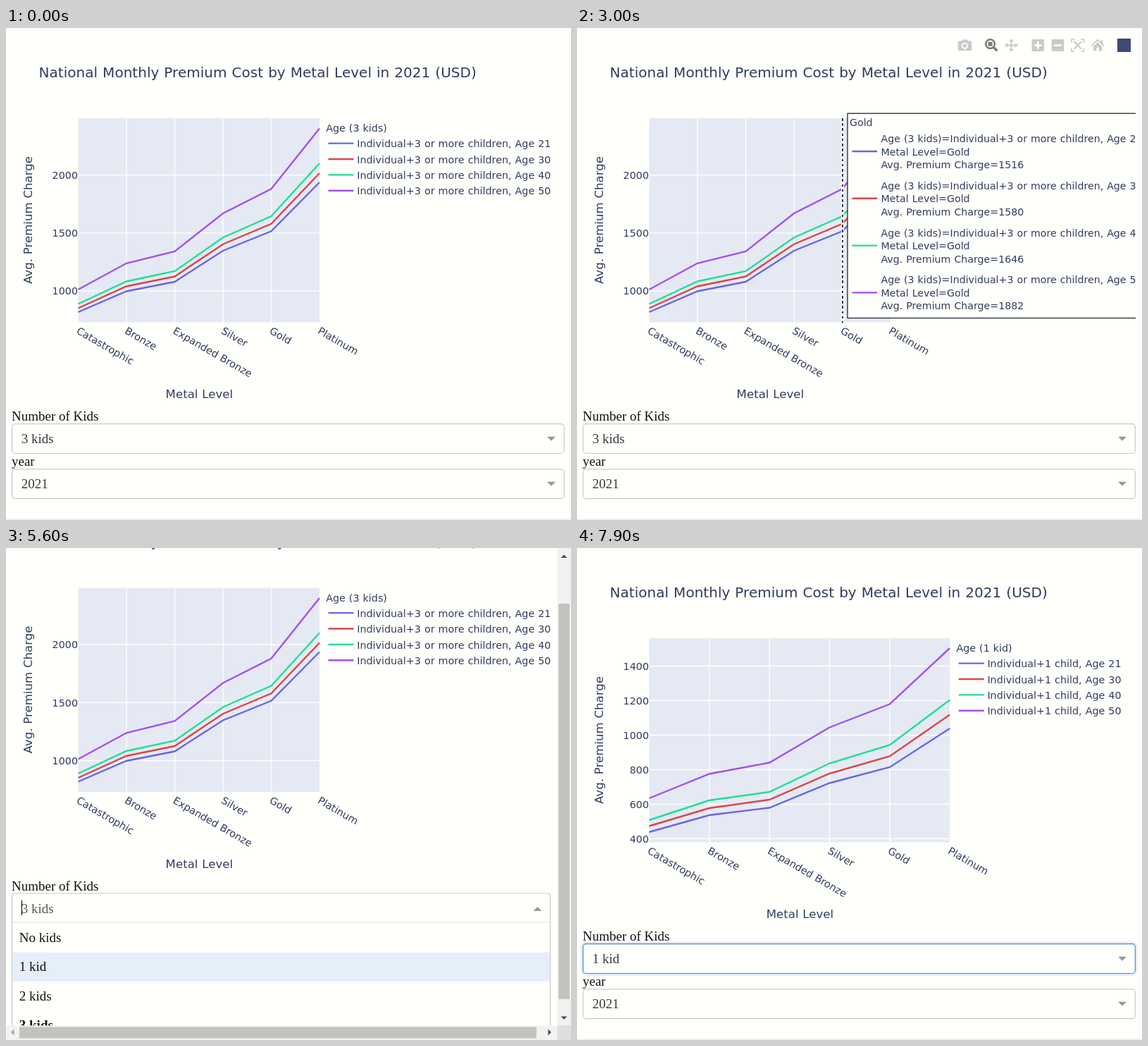
An HTML page for the animation above (8000 ms loop, 802 by 698 pixels).

```html
<!DOCTYPE html>
<html lang="en">
<head>
<meta charset="utf-8">
<title>Premium chart</title>
<style>
  html, body { margin: 0; width: 100%; height: 100%; overflow: hidden; background: #fffffc; }
  svg { display: block; width: 802px; height: 698px; }
  text { font-family: "DejaVu Sans", sans-serif; fill: #303c5c; white-space: pre; word-spacing: .034em; }
  .serif text { font-family: "Liberation Serif", serif; font-size: 19px; fill: #111; word-spacing: 0; }
  .serif .value { fill: #3a3a3a; }
  .frame { fill: #fffffc; stroke: #c9c9c9; stroke-width: 1.2; }
</style>
</head>
<body>
<svg id="stage" viewBox="0 0 802 698"></svg>
<script>
const LOOP = 8000, SCROLL = 71.5, LEFT = 102.5, BG = '#fffffc';
const COLORS = ['#6666e6', '#dc4545', '#1ddf96', '#a350ee'];
const AGES = [21, 30, 40, 50];
const LEVELS = ['Catastrophic', 'Bronze', 'Expanded Bronze', 'Silver', 'Gold', 'Platinum'];

const THREE = {
  kids: '3 kids', who: 'Individual+3 or more children',
  ticks: [2000, 1500, 1000], top: 208.7, gap: 82.25,
  lines: [
    [403, 373.5, 360, 316, 288.3, 219],
    [397.5, 366.5, 352.5, 306.7, 277.8, 206],
    [391.5, 359.5, 345, 297.2, 267, 192],
    [371, 333.8, 317, 263, 228.2, 142.5]]
};
const ONE = {
  kids: '1 kid', who: 'Individual+1 child',
  ticks: [1400, 1200, 1000, 800, 600, 400], top: 167.5, gap: 49,
  lines: [
    [403, 379, 368.5, 333.5, 311, 256],
    [394.5, 369, 357, 320, 295.5, 236.5],
    [386, 358, 346, 305.5, 279.5, 215.5],
    [355, 320.5, 304.5, 254.5, 221.5, 142]]
};

const text = (x, y, s, size = 14.3, more = '') =>
  `<text x="${x}" y="${y}" font-size="${size}" ${more}>${s}</text>`;
const rect = (x, y, w, h, fill, more = '') =>
  `<rect x="${x}" y="${y}" width="${w}" height="${h}" fill="${fill}" ${more}/>`;
const path = (d, stroke, width, more = '') =>
  `<path d="${d}" fill="none" stroke="${stroke}" stroke-width="${width}" ${more}/>`;
const shape = (d, fill) => `<path d="${d}" fill="${fill}" fill-rule="evenodd"/>`;
const group = (id, body, more = '') => `<g id="${id}" ${more}>${body}</g>`;

function chart(id, right, data) {
  const xs = LEVELS.map((_, i) => LEFT + (right - LEFT) * i / 5);
  let out = rect(LEFT, 128, right - LEFT, 289.5, '#e5e9f3');
  xs.slice(1, 5).forEach(x => out += path(`M${x} 128V417.5`, '#fff', 1.3));
  data.ticks.forEach((v, i) => {
    const y = data.top + i * data.gap;
    out += path(`M${LEFT} ${y}H${right}`, '#fff', 1.3);
    out += text(102, y + 5.2, v, 14.3, 'text-anchor="end"');
  });
  data.lines.forEach((ys, i) => {
    const y = 163.6 + i * 22.4;
    out += path('M' + ys.map((v, k) => `${xs[k]} ${v}`).join('L'), COLORS[i], 2.4);
    out += path(`M${right + 12.5} ${y}h36`, COLORS[i], 2.4);
    out += text(right + 53.2, y + 5.6, `${data.who}, Age ${AGES[i]}`);
  });
  LEVELS.forEach((s, i) => out += text(0, 0, s, 14.4,
    `transform="translate(${xs[i] - 3.6} 432.6) rotate(30)"`));
  out += text(right + 9.2, 147, `Age (${data.kids})`);
  out += text((LEFT + right) / 2 + .6, 525, 'Metal Level', 16.6, 'text-anchor="middle"');
  return group(id, out);
}

function hoverCard() {
  let out = path('M377 128V417.5', BG, 4, 'shape-rendering="crispEdges"');
  out += path('M377 128V417.5', '#303036', 2, 'stroke-dasharray="3.6 3.6" shape-rendering="crispEdges"');
  out += rect(384, 121.2, 430, 290.3, BG, 'stroke="#30343c" stroke-width="1.4"');
  out += text(387, 139.2, 'Gold', 14.2);
  [1516, 1580, 1646, 1882].forEach((v, i) => {
    const y = 162 + i * 66.8;
    out += path(`M390.5 ${y + 13}h35.5`, COLORS[i], 2.4);
    [`Age (3 kids)=${THREE.who}, Age ${AGES[i]}`, 'Metal Level=Gold', `Avg. Premium Charge=${v}`]
      .forEach((s, k) => out += text(431.5, y + k * 18.5, s, 14.2));
  });
  return group('hover', out, 'clip-path="url(#edge)"');
}

function modebar() {
  const g = '#cacacc', d = '#7d7d82';
  const box = x => rect(x, 16, 17.4, 17, g, 'rx="1.5"');
  let out = shape('M542.5 18.5h3l1.5-2h7l1.5 2h3q1.7 0 1.7 1.7v10.3q0 1.7-1.7 1.7h-16q-1.7 0-1.7-1.7V20.2' +
    'q0-1.7 1.7-1.7zM550.5 20.6a4.6 4.6 0 1 0 .01 0z', g);
  out += `<circle cx="550.5" cy="25.2" r="2.6" fill="${g}"/>`;
  out += `<circle cx="586.6" cy="22.6" r="6.3" fill="none" stroke="${d}" stroke-width="2.6"/>`;
  out += rect(583.6, 19.6, 6, 6, d) + path('M591.5 27.5l5 5', d, 3.4);
  out += path('M616.5 18v13M610 24.5h13', g, 2);
  out += shape('M616.5 15l3.5 4.2h-7zM616.5 34l3.5-4.2h-7zM607 24.5l4.2-3.5v7zM626 24.5l-4.2-3.5v7z', g);
  out += box(645.6) + path('M649 24.5h10.6M654.3 19.2v10.6', BG, 2.6);
  out += box(673.8) + path('M677.2 24.5h10.6', BG, 2.6);
  out += path('M702 20.5V16h4.5M715 16h4.5v4.5M719.5 28.5V33H715M706.5 33H702v-4.5', g, 1.7);
  out += path('M705.5 19.3l10.5 10.5M716 19.3l-10.5 10.5', g, 2.2);
  out += shape('M739.2 15.5l4.8 4.7v-3h2.3v5.3l2.2 2.3-1.2 1.2-8.1-7.9-8.1 7.9-1.2-1.2z', g);
  out += shape('M739.2 20l6 6v6.5h-4.3v-5h-3.4v5h-4.3V26z', g);
  return group('bar', out + rect(767, 15, 19, 19, '#3d4a75'));
}

const control = (y, id, value) =>
  `<rect id="${id}Box" class="frame" x="8.6" y="${y}" width="783.8" height="41.8" rx="4.5"/>` +
  `<text id="${id}" class="value" x="21.8" y="${y + 27.2}">${value}</text>` +
  shape(`M768 ${y + 18}h12l-6 6z`, '#999');

function menu() {
  let out = rect(0, 489, 802, 209, BG);
  out += '<path class="frame" d="M8.6 700V494.5q0-4.5 4.5-4.5H768q4.5 0 4.5 4.5V700"/>';
  out += path('M9 531H772', '#e2e2e2', 1.2);
  out += '<rect id="pick" x="9.2" width="762.7" height="41.4" fill="#e5effa"/>';
  out += '<text class="value" x="21.8" y="517.6" style="fill:#555">3 kids</text>';
  out += shape('M748.5 515h12l-6-6z', '#999') + rect(21.8, 500, 1.2, 21, '#111', 'id="caret"');
  ['No kids', '1 kid', '2 kids', '3 kids'].forEach((s, i) =>
    out += `<text x="18.8" y="${558.7 + i * 41.4}"${i > 2 ? ' font-weight="bold"' : ''}>${s}</text>`);
  out += path('M9 697.3H772', '#c9c9c9', 1.2);
  return group('menu', out, 'class="serif"');
}

function scrollbars() {
  const track = '#f2f2f0', dark = '#4c4c4c';
  let out = rect(782.5, 0, 19.5, 698, track) + rect(784.3, 0, 15.7, 0, '#c2c2bf', 'id="thumb"');
  out += shape('M787.5 14h9l-4.5-4.5z', dark) + group('down', shape('M787.5 0h9l-4.5 4.5z', dark));
  out += group('across', rect(0, 677.5, 782.5, 20.5, track) + rect(19, 679.5, 734, 16, '#c2c2bf') +
    rect(782.5, 677.5, 19.5, 20.5, '#dedee0') +
    shape('M11.5 682.5v9l-4.5-4.5z', '#a5a5a5') + shape('M769.5 682.5v9l4.5-4.5z', dark));
  return group('bars', out);
}

const stage = document.getElementById('stage');
stage.innerHTML =
  '<defs><clipPath id="edge"><rect x="360" y="0" width="433" height="698"/></clipPath></defs>' +
  rect(0, 0, 802, 698, BG) +
  group('page',
    text(46.6, 69.5, 'National Monthly Premium Cost by Metal Level in 2021 (USD)', 20.05) +
    text(0, 0, 'Avg. Premium Charge', 16.6, 'text-anchor="middle" transform="translate(36.8 272.5) rotate(-90)"') +
    chart('wide', 445, THREE) + chart('narrow', 426.4, THREE) + chart('single', 529.2, ONE) +
    hoverCard() + modebar() +
    group('form', '<text x="8" y="557">Number of Kids</text><text x="8" y="621">year</text>' +
      '<rect id="glow" x="7" y="560" width="787" height="45" rx="6" fill="none" stroke="#dcebf8" stroke-width="3"/>' +
      control(561.7, 'kids', '3 kids') + control(625.8, 'year', '2021'), 'class="serif"')) +
  group('foot', rect(0, 696.7, 802, 1.3, '#ececea')) + menu() + scrollbars();

const $ = Object.fromEntries([...stage.querySelectorAll('[id]')].map(e => [e.id, e]));
const show = (e, on) => e.setAttribute('visibility', on ? 'inherit' : 'hidden');
const within = (t, a, b) => t >= a && t < b;
const ease = (t, start, span) => {
  const p = Math.min(1, Math.max(0, (t - start) / span));
  return 1 - (1 - p) ** 2;
};
// Highlighted option: [from ms, row]
const PICKS = [[0, 1], [5900, 2], [6100, 3], [7000, 2], [7100, 1]];

function draw(t) {
  const open = within(t, 5600, 7400), resized = t >= 5700, done = t >= 7400, fresh = t >= 7500;
  $.page.setAttribute('transform', `translate(0 ${open ? -SCROLL : 0})`);
  show($.wide, !fresh && !(resized && open));
  show($.narrow, resized && open);
  show($.single, fresh);
  show($.hover, within(t, 1200, 2500) || within(t, 2700, 4300));
  $.bar.setAttribute('opacity', ease(t, 100, 300) - ease(t, 4800, 300));

  show($.menu, open);
  show($.bars, open);
  show($.foot, !open);
  show($.across, open && !resized);
  $.thumb.setAttribute('y', resized ? 82 : 79);
  $.thumb.setAttribute('height', resized ? 595 : 561);
  $.down.setAttribute('transform', `translate(0 ${resized ? 684 : 664.5})`);
  const row = PICKS.filter(p => p[0] <= t).pop()[1];
  $.pick.setAttribute('y', 532.3 + row * 41.4);
  show($.caret, open && Math.floor((t - 5600) / 540) % 2 === 0);

  $.kids.textContent = done ? '1 kid' : '3 kids';
  $.kidsBox.style.stroke = done ? '#4a90cc' : '';
  show($.glow, done);
}

const start = performance.now();
(function tick() {
  draw((performance.now() - start) % LOOP);
  requestAnimationFrame(tick);
})();
</script>
</body>
</html>
```
